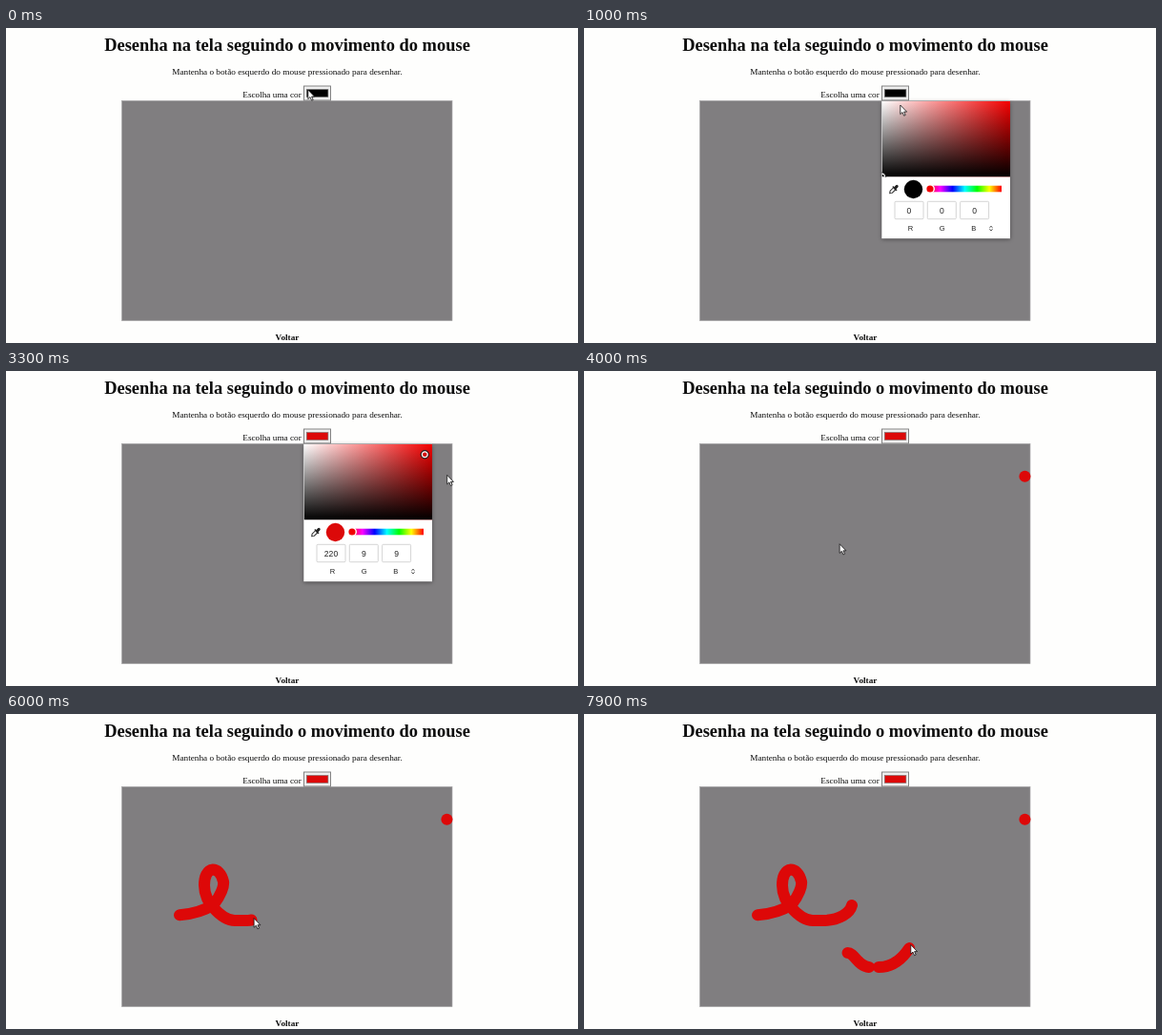
These frames come from a looping animation (600 px wide and 331 px high, 8 s). An HTML page:

```html
<!DOCTYPE html>
<html lang="pt">
<head>
<meta charset="utf-8">
<style>
html, body { margin: 0; height: 100%; overflow: hidden; background: #fefefd; }
svg { display: block; }
text { text-anchor: middle; fill: #0c0c0c; font: 9.23px "Liberation Serif", serif; }
.title { font-size: 18.46px; font-weight: bold; }
.bold { font-weight: bold; }
#popup { filter: drop-shadow(0 1px 2px rgba(0, 0, 0, .4)); }
#popup text { font: 8.6px "Liberation Sans", sans-serif; fill: #222; }
#popup .label { font-size: 7.6px; }
.field { fill: #fff; stroke: #c9c9c9; stroke-width: .8; }
#gestures { fill: none; stroke-width: 12; stroke-linecap: round; stroke-linejoin: round; }
.ink { stroke: #dd0808; }
</style>
</head>
<body>
<svg width="600" height="331" viewBox="0 0 600 331">
  <defs>
    <linearGradient id="sat"><stop stop-color="#fff"/><stop offset="1" stop-color="#f40000"/></linearGradient>
    <linearGradient id="val" x2="0" y2="1"><stop stop-opacity="0"/><stop offset="1"/></linearGradient>
    <linearGradient id="hue"></linearGradient>
  </defs>

  <text class="title" x="295" y="24">Desenha na tela seguindo o movimento do mouse</text>
  <text x="295" y="49">Mantenha o botão esquerdo do mouse pressionado para desenhar.</text>
  <text x="279" y="73">Escolha uma cor</text>
  <text class="bold" x="295" y="328">Voltar</text>

  <rect x="121.5" y="76.5" width="346.5" height="231" fill="#807e80" stroke="#a5a4a5" stroke-width=".7"/>
  <rect x="312.5" y="61" width="28" height="15" fill="#efefef" stroke="#777" stroke-width=".9"/>
  <rect class="chosen" x="315.3" y="64.5" width="22.6" height="8" stroke="#777" stroke-width=".6"/>
  <g id="gestures"></g>

  <g id="popup">
    <rect x="312.3" y="76.8" width="134.7" height="144.4" fill="#fff"/>
    <svg x="312.5" y="77" width="134.5" height="79.5">
      <rect width="100%" height="100%" fill="url(#sat)"/>
      <rect width="100%" height="100%" fill="url(#val)"/>
      <g id="handle" fill="none">
        <circle r="4" stroke="#222" stroke-width="1.4"/>
        <circle r="2.9" stroke="#fff" stroke-width="1.2"/>
      </g>
    </svg>
    <g transform="translate(325 169.5) rotate(45)" stroke="#222" fill="none">
      <path d="M-1.5 -1V4L0 6L1.5 4V-1"/>
      <path d="M-3 -1.3H3" stroke-width="1.4"/>
      <path d="M0 -2V-4.5" stroke-width="3" stroke-linecap="round"/>
    </g>
    <circle class="chosen" cx="345.5" cy="169.5" r="9.7"/>
    <rect x="361" y="165.7" width="77" height="6.6" fill="url(#hue)"/>
    <circle cx="363" cy="169" r="4.3" fill="#f00000" stroke="#fff" stroke-width="1.4"/>
    <g id="fields"></g>
    <path d="M425.4 209.8L427 208.3L428.6 209.8M425.4 211.4L427 212.9L428.6 211.4" fill="none" stroke="#333" stroke-width=".9"/>
  </g>

  <path id="cursor" d="M0 0V9.6L2.2 7.6L3.8 11.2L5.4 10.5L3.8 7.1H6.8Z" fill="#fff" stroke="#111" stroke-width=".8"/>
</svg>
<script>
const $ = id => document.getElementById(id);
const all = selector => [...document.querySelectorAll(selector)];
const LOOP = 8000, STEP = 100, OPEN = 400, PICK = 2000, CLOSE = 3400;
const INK_LAG = 20; // the line trails the pointer a little

const smooth = u => u * u * (3 - 2 * u);
const speedUp = u => u ** 1.25;
const linear = u => u;

const move = (from, to, d) => ({ from, to, d, ease: smooth });
const ink = (from, to, d, ease = linear) => ({ from, to, d, ease, ink: true });

const gestures = [
  move(300, 900, "M316.5 66.5L331.5 82.5"),
  move(1300, 1750, "M331.5 82.5L439.5 89.5"),
  move(2200, 2900, "M439.5 89.5L462.4 110.8"),
  ink(CLOSE - INK_LAG, CLOSE, "M462.4 110.8h.1"),
  move(3500, 4400, "M462.4 110.8Q300 190 152 203L182 211.3"),
  ink(4530, 6180, `M182 211.3C198 210 209 206 218 200C225 191 229 181 228 176
    C226 167 221 163.5 217 163.5C211 164 208 171 208 180C208 190 213 199 217 203
    C224 211 231 217 240 217H250C268 217 279 209 281 201`, speedUp),
  move(6300, 6900, "M281 201L276.5 251"),
  ink(7150, 7500, "M276.5 251C284 251 287 265 299 266"),
  ink(7550, 7900, "M309 266C323 266 334 258 342.5 244")
];

$("gestures").innerHTML = gestures.map(g => `<path d="${g.d}" class="${g.ink ? "ink" : ""}"/>`).join("");
gestures.forEach((g, i) => {
  g.path = $("gestures").children[i];
  g.length = g.path.getTotalLength();
});

$("hue").innerHTML = Array.from({ length: 7 }, (_, i) =>
  `<stop offset="${i / 6}" stop-color="hsl(${360 - i * 60} 100% 50%)"/>`).join("");

$("fields").innerHTML = ["R", "G", "B"].map((name, i) => {
  const x = 341 + i * 34.3;
  return `<rect class="field" x="${x - 15}" y="182.3" width="30" height="18.4" rx="1"/>
    <text class="value" x="${x}" y="194.6"></text>
    <text class="label" x="${342.5 + i * 33.2}" y="213">${name}</text>`;
}).join("");

const reached = (g, t) =>
  g.length * g.ease(Math.min(1, Math.max(0, (t - g.from) / (g.to - g.from))));

function draw(now) {
  const t = Math.floor(now % LOOP / STEP) * STEP;
  const picked = t >= PICK;
  const rgb = picked ? [220, 9, 9] : [0, 0, 0];

  for (const g of gestures) {
    const time = t - INK_LAG;
    g.path.style.display = g.ink && time >= g.from ? "" : "none";
    g.path.style.strokeDasharray = `${reached(g, time)} 999`;
  }
  const current = gestures.findLast(g => t >= g.from) || gestures[0];
  const tip = current.path.getPointAtLength(reached(current, t));
  $("cursor").setAttribute("transform", `translate(${tip.x + .3} ${tip.y - 1.5})`);

  $("popup").style.display = t >= OPEN && t < CLOSE ? "" : "none";
  $("handle").setAttribute("transform", picked ? "translate(126.8 10.8)" : "translate(0 79)");
  all(".chosen").forEach(el => el.style.fill = `rgb(${rgb})`);
  all(".value").forEach((el, i) => el.textContent = rgb[i]);
  requestAnimationFrame(draw);
}
requestAnimationFrame(draw);
</script>
</body>
</html>
```
